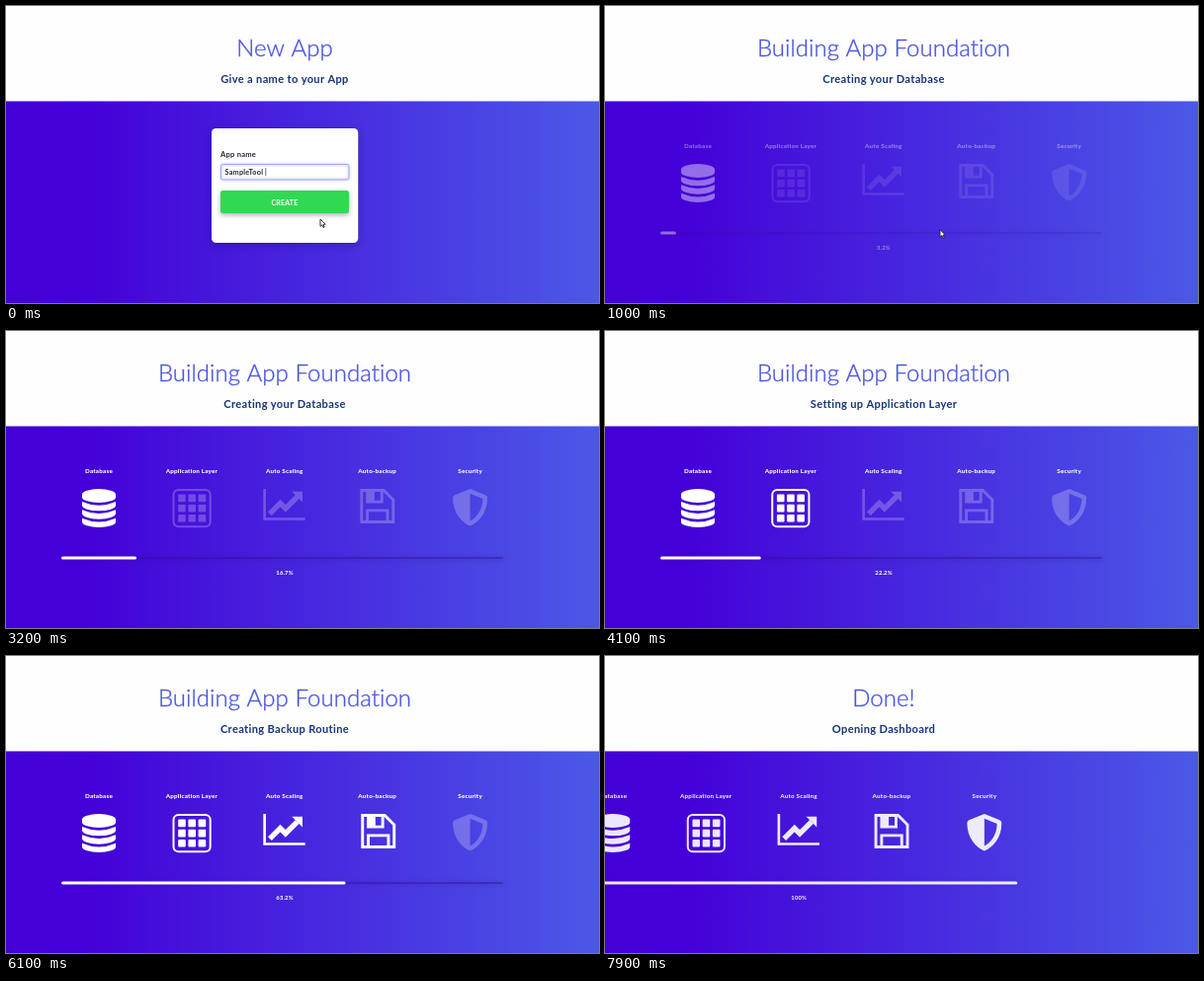
An HTML page with a canvas for the animation above (9 s loop, 600 px wide and 301 px high).

```html
<!DOCTYPE html>
<html lang="en">
<head>
<meta charset="utf-8">
<title>New App</title>
<style>
html, body { margin: 0; width: 100%; height: 100%; overflow: hidden; background: #fefefe; }
canvas { display: block; }
</style>
</head>
<body>
<canvas id="stage" width="600" height="301"></canvas>
<script>
const ctx = document.getElementById('stage').getContext('2d');
const LOOP = 9000, STEP = 100, LAST = 7900;
const CLICK = 526, SCENE_IN = 790, DONE = 7690, CURSOR_GONE = 2000;
const MID = 282;
const BAR = { x: 56, y: 230, w: 447 };
// Progress: steady at first, then faster and slightly accelerating
const SLOW = { from: 470, rate: 6.12 };
const FAST = { from: 4130, base: 22.4, rate: 18.9, acc: 0.92 };

const STAGES = [
  { label: 'Database', task: 'Creating your Database', icon: database },
  { label: 'Application Layer', task: 'Setting up Application Layer', icon: grid },
  { label: 'Auto Scaling', task: 'Setting up Auto-scaling', icon: chart },
  { label: 'Auto-backup', task: 'Creating Backup Routine', icon: floppy },
  { label: 'Security', task: 'Implementing Security Protocols', icon: shield }
];
STAGES.forEach((s, i) => {
  s.x = 94 + i * 93.9;
  s.at = timeAt(i * 20);
});

function clamp(v, max = 1) {
  return Math.max(0, Math.min(max, v));
}

function progress(t) {
  const s = (t - FAST.from) / 1000;
  const p = s < 0
    ? SLOW.rate * (t - SLOW.from) / 1000
    : FAST.base + FAST.rate * s + FAST.acc * s * s;
  return clamp(p, 100);
}

// Inverse of progress()
function timeAt(p) {
  if (p < FAST.base) return SLOW.from + 1000 * p / SLOW.rate;
  const root = Math.sqrt(FAST.rate ** 2 + 4 * FAST.acc * (p - FAST.base));
  return FAST.from + 1000 * (root - FAST.rate) / (2 * FAST.acc);
}

// CSS "ease": cubic-bezier(.25, .1, .25, 1)
function ease(x) {
  let lo = 0, hi = 1;
  for (let i = 0; i < 24; i++) {
    const s = (lo + hi) / 2;
    if (0.75 * s * (1 - s) + s ** 3 < x) lo = s; else hi = s;
  }
  const s = lo, r = 1 - s;
  return 0.3 * r * r * s + 3 * r * s * s + s ** 3;
}

// A small step right, then away to the left while fading
function bounceOut(elapsed) {
  const u = clamp(elapsed / 750);
  if (u < 0.2) return { x: 10 * ease(u / 0.2), alpha: 1 };
  const f = ease((u - 0.2) / 0.8);
  return { x: 10 - 1010 * f, alpha: 1 - f };
}

// Damped head shake, half a second long
function shake(elapsed) {
  const u = clamp(elapsed / 500);
  return -3 * Math.sin(4 * Math.PI * u) * (1 - u);
}

function text(str, x, y, size, weight, color, align = 'center') {
  ctx.font = `${weight} ${size}px Lato, "Open Sans", sans-serif`;
  ctx.letterSpacing = (weight > 400 ? size * 0.03 : 0.05) + 'px';
  ctx.textAlign = align;
  ctx.fillStyle = color;
  ctx.fillText(str, x, y);
}

function box(x, y, w, h, r) {
  ctx.beginPath();
  ctx.roundRect(x, y, w, h, r);
}

function line(...points) {
  points.forEach(([x, y], i) => i ? ctx.lineTo(x, y) : ctx.moveTo(x, y));
}

function shadow(color, blur, y, x = 0) {
  ctx.shadowColor = color;
  ctx.shadowBlur = blur;
  ctx.shadowOffsetX = x;
  ctx.shadowOffsetY = y;
}
const noShadow = () => shadow('transparent', 0, 0);

// Icons are centred on x = 0 with their top at y = 0

function database() {
  const r = 17, ry = 5.57;
  ctx.beginPath();
  ctx.ellipse(0, ry, r, ry, 0, Math.PI, 0);
  ctx.ellipse(0, 8.4, r, ry, 0, 0, Math.PI);
  ctx.fill();
  for (let y = 13; y < 30; y += 8.36) {
    ctx.beginPath();
    ctx.moveTo(-r, y);
    ctx.quadraticCurveTo(0, y + 7.4, r, y);
    ctx.ellipse(0, y + 3.7, r, ry, 0, 0, Math.PI);
    ctx.fill();
  }
}

function grid() {
  ctx.lineWidth = 2;
  box(-18.4, 1, 37.2, 37.2, 5);
  ctx.stroke();
  for (let i = 0; i < 9; i++) {
    box(-13.7 + (i % 3) * 10.2, 5.6 + Math.floor(i / 3) * 10.2, 7.6, 7.6, 1);
    ctx.fill();
  }
}

function chart() {
  ctx.translate(-21.5, 0);
  ctx.beginPath();
  ctx.rect(0, 0, 2.65, 29.2);
  ctx.rect(0, 29.2, 42.4, 2.6);
  line([29, 2.7], [39.7, 2.7], [39.7, 13.4]);
  ctx.fill();
  ctx.lineWidth = 5.4;
  ctx.beginPath();
  line([6.6, 25.2], [17.2, 14.6], [22.5, 19.9], [34.35, 8.05]);
  ctx.stroke();
}

function floppy() {
  ctx.translate(-17.4, 0);
  ctx.lineWidth = 2.9;
  ctx.beginPath();
  line([1.5, 1.5], [24, 1.5], [33.5, 11], [33.5, 33.5], [1.5, 33.5]);
  ctx.closePath();
  line([7.3, 33.5], [7.3, 21.9], [27.7, 21.9], [27.7, 33.5]);
  line([7.3, 1.5], [7.3, 13.1], [21.9, 13.1], [21.9, 1.5]);
  line([10.2, 1.5], [10.2, 13.1]);
  line([13.1, 1.5], [13.1, 13.1]);
  ctx.stroke();
}

function shield() {
  ctx.beginPath();
  ctx.moveTo(0, 0);
  ctx.lineTo(15.5, 6.2);
  ctx.quadraticCurveTo(17.5, 7, 17.5, 9.3);
  ctx.bezierCurveTo(17.5, 25, 8, 34.5, 0, 37.5);
  ctx.bezierCurveTo(-8, 34.5, -17.5, 25, -17.5, 9.3);
  ctx.quadraticCurveTo(-17.5, 7, -15.5, 6.2);
  ctx.closePath();
  ctx.moveTo(0, 4.8);
  ctx.lineTo(12.8, 10.1);
  ctx.bezierCurveTo(12.6, 21, 6.9, 29.2, 0, 32.6);
  ctx.fill('evenodd');
}

function drawBackdrop() {
  ctx.fillStyle = '#fefefe';
  ctx.fillRect(0, 0, 600, 301);
  const g = ctx.createLinearGradient(0, 0, 600, 0);
  g.addColorStop(0, '#4300d6');
  g.addColorStop(0.13, '#4400d8');
  g.addColorStop(1, '#4b58e7');
  ctx.fillStyle = g;
  ctx.fillRect(0, 96.5, 600, 205);
}

function drawHeading(t) {
  let title = 'New App', sub = 'Give a name to your App';
  if (t >= DONE) {
    title = 'Done!';
    sub = 'Opening Dashboard';
  } else if (t >= CLICK) {
    title = 'Building App Foundation';
    sub = STAGES.filter(s => t >= s.at).pop().task;
  }
  text(title, MID, 51, 24, 300, '#4a55e2');
  ctx.strokeStyle = '#4a55e2';
  ctx.lineWidth = 0.35;
  ctx.strokeText(title, MID, 51);
  text(sub, MID, 78, 11.1, 700, '#17357a');
}

function drawCard(t) {
  const move = bounceOut(t - CLICK), pressed = t >= CLICK;
  ctx.save();
  ctx.globalAlpha = move.alpha;
  ctx.translate(move.x, 0);

  shadow('rgba(0,0,40,.3)', 8, 2);
  ctx.fillStyle = '#fff';
  box(208, 124, 148.3, 116, 4.5);
  ctx.fill();
  noShadow();

  text('App name', 217, 153, 7.6, 700, '#27273a', 'left');
  ctx.lineWidth = 1;
  ctx.strokeStyle = pressed ? '#e6e6ef' : '#a9a6f4';
  if (!pressed) shadow('rgba(90,120,255,.7)', 3, 0);
  box(217.5, 160.5, 129.5, 15.5, 2);
  ctx.stroke();
  noShadow();
  text('SampleTool', 221.5, 170.6, 7.3, 700, '#27273a', 'left');
  if (!pressed) {
    ctx.fillStyle = '#333';
    ctx.fillRect(262.5, 164, 0.7, 8);
  }

  const dy = pressed ? 1 : 0;
  shadow('rgba(20,20,50,.35)', 5, 2);
  ctx.fillStyle = pressed ? '#28a745' : '#31d953';
  box(217, 187 + dy, 130, 23, 2.5);
  ctx.fill();
  noShadow();
  text('CREATE', MID, 202 + dy, 7, 700, '#fff');
  ctx.restore();
}

function drawScene(t) {
  const move = bounceOut(t - DONE);
  const alpha = move.alpha * clamp((t - SCENE_IN) / 500);
  ctx.save();
  ctx.translate(move.x, 0);

  for (const s of STAGES) {
    ctx.globalAlpha = alpha;
    text(s.label, s.x, 144, 6.3, 800, '#fff');
    ctx.save();
    ctx.globalAlpha = alpha * (t >= s.at ? 1 : 0.24);
    ctx.translate(s.x + shake(t - s.at), 160);
    ctx.fillStyle = ctx.strokeStyle = '#fff';
    s.icon();
    ctx.restore();
  }

  ctx.globalAlpha = alpha;
  shadow('rgba(20,0,80,.6)', 5, 0.5, 2);
  ctx.fillStyle = 'rgba(48,16,150,.4)';
  box(BAR.x, BAR.y - 1, BAR.w, 2, 1);
  ctx.fill();
  noShadow();
  // The bar runs slightly ahead of its label
  ctx.fillStyle = '#fff';
  box(BAR.x, BAR.y - 1.5, BAR.w * progress(t + 50) / 100, 3, 1.5);
  ctx.fill();

  const done = progress(t);
  text((done < 100 ? done.toFixed(1) : done) + '%', MID, 247.3, 5.9, 800, '#fff');
  ctx.restore();
}

function drawCursor(t) {
  if (t >= CURSOR_GONE) return;
  const drop = Math.max(0, t - 1500) * 0.12;
  ctx.save();
  ctx.translate(318 + t * 0.021, 216 + t * 0.0107 + drop);
  ctx.beginPath();
  line([0, 0], [0, 7.4], [1.8, 5.9], [3, 8.6], [4.2, 8], [3, 5.4], [5.2, 5.2]);
  ctx.closePath();
  ctx.fillStyle = '#fff';
  ctx.fill();
  ctx.lineWidth = 0.9;
  ctx.strokeStyle = '#1c1c2c';
  ctx.stroke();
  ctx.restore();
}

function draw(t) {
  drawBackdrop();
  drawHeading(t);
  if (t < SCENE_IN) drawCard(t); else drawScene(t);
  drawCursor(t);
}

const start = performance.now();
function tick() {
  const t = (performance.now() - start) % LOOP;
  draw(Math.min(LAST, Math.floor(t / STEP) * STEP));
  requestAnimationFrame(tick);
}
tick();
</script>
</body>
</html>
```
